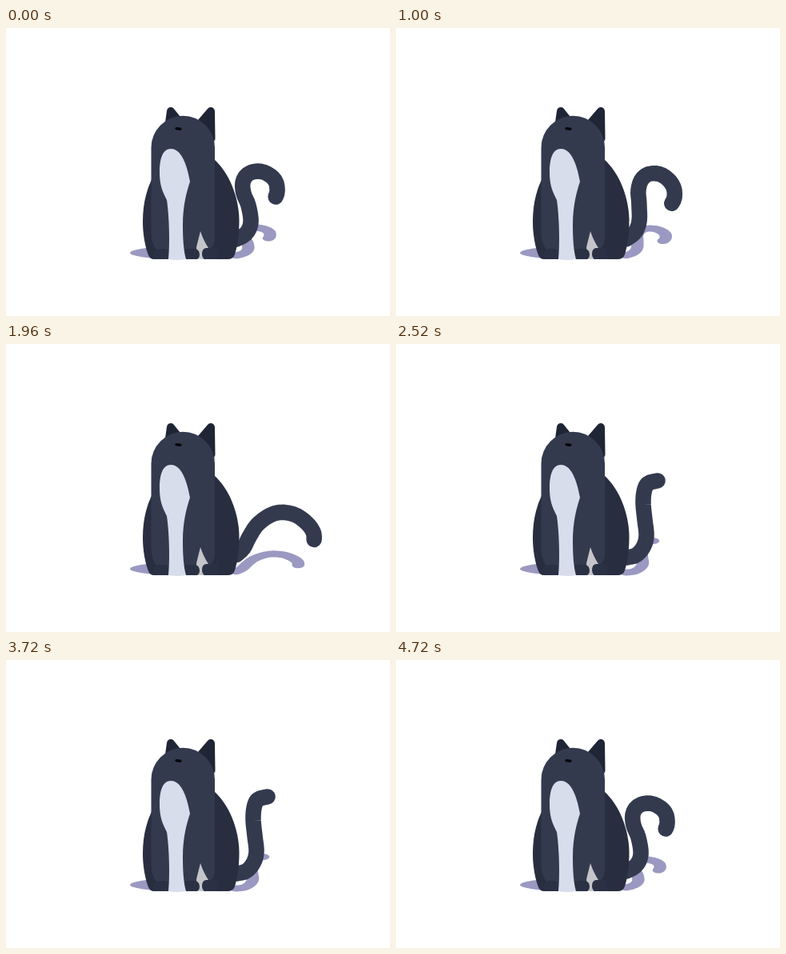
Write an HTML page with a canvas that moves like this. It is 480 by 360 pixels and loops after 4.8 s.

```html
<!DOCTYPE html>
<html lang="en">
<head>
<meta charset="utf-8">
<title>Cat wagging its tail</title>
<style>
html, body { margin: 0; width: 100%; height: 100%; overflow: hidden; background: #fff; }
canvas { display: block; width: 480px; height: 360px; }
</style>
</head>
<body>
<canvas id="stage" width="480" height="360"></canvas>
<script>
const ctx = document.getElementById('stage').getContext('2d');
const STEP = 40, LOOP = 1200, SWING = 1120, PARTS = 36;
const COAT = '#343a4e', SIDE = '#282e3f', PAW = '#2b3145', EAR = '#1f2535',
      BIB = '#d8ddeb', GAP = '#c5c5c9', SHADE = '#9b98c1';

// Tail centre lines, base to tip, at key times of the swing
const poses = [
  [0,   [288,264, 300,257, 306,243, 303,222, 297,207, 296,193, 302,183, 315,179, 328,183, 337,192, 339,204, 337,211]],
  [120, [288,267, 300,264, 309,254, 313,240, 311,220, 309,200, 310,185, 314,175, 322,172, 327,171]],
  [360, [288,262, 297,270, 309,282, 323,293, 346,299, 370,294, 384,283, 389,271, 387,260, 380,255]],
  [520, [288,257, 303,259, 318,264, 330,275, 340,292, 349,308, 360,321, 375,330, 386,329, 393,323]],
  [560, [288,257, 303,258, 319,263, 331,275, 339,292, 347,309, 357,325, 370,337, 381,342, 390,343]],
  [720, [288,263, 297,255, 306,241, 320,227, 343,219, 365,223, 381,234, 390,245, 392,254]]
];

function hermite(a, b, ma, mb, u) {
  const v = u * u, w = v * u;
  return (2 * w - 3 * v + 1) * a + (w - 2 * v + u) * ma + (3 * v - 2 * w) * b + (w - v) * mb;
}

// Smooth a point list and turn it into base height, length and headings
function measure(list) {
  const n = list.length / 2, fine = [];
  const at = (i, k) => list[2 * Math.max(0, Math.min(n - 1, i)) + k];
  for (let i = 0; i < n - 1; i++) {
    for (let j = 0; j < 16; j++) {
      fine.push([0, 1].map(k => hermite(at(i, k), at(i + 1, k),
        (at(i + 1, k) - at(i - 1, k)) / 2, (at(i + 2, k) - at(i, k)) / 2, j / 16)));
    }
  }
  fine.push([at(n - 1, 0), at(n - 1, 1)]);
  const dist = [0];
  for (let i = 1; i < fine.length; i++) {
    dist.push(dist[i - 1] + Math.hypot(fine[i][0] - fine[i - 1][0], fine[i][1] - fine[i - 1][1]));
  }
  const total = dist[dist.length - 1];
  const along = s => {
    let i = 1;
    while (i < dist.length - 1 && dist[i] < s) i++;
    const u = (s - dist[i - 1]) / (dist[i] - dist[i - 1]);
    return [0, 1].map(k => fine[i - 1][k] + (fine[i][k] - fine[i - 1][k]) * u);
  };
  const out = [list[1], total];
  let last = 0;
  for (let i = 0; i < PARTS; i++) {
    const p = along(total * i / PARTS), q = along(total * (i + 1) / PARTS);
    let a = Math.atan2(q[1] - p[1], q[0] - p[0]);
    a -= 2 * Math.PI * Math.round((a - last) / (2 * Math.PI));
    out.push(a);
    last = a;
  }
  return out;
}

const keys = poses.map(([t, list]) => ({ t, v: measure(list) }));

function key(i) {
  const n = keys.length, turn = Math.floor(i / n), k = keys[i - turn * n];
  return { t: k.t + turn * SWING, v: k.v };
}

function tailAt(t) {
  let i = 0;
  while (key(i + 1).t <= t) i++;
  const [p, a, b, q] = [-1, 0, 1, 2].map(d => key(i + d));
  const span = b.t - a.t, u = (t - a.t) / span;
  const val = a.v.map((x, k) => hermite(x, b.v[k],
    (b.v[k] - p.v[k]) / (b.t - p.t) * span, (q.v[k] - x) / (q.t - a.t) * span, u));
  let x = 288, y = val[0];
  const pts = [[x, y]], step = val[1] / PARTS;
  for (const h of val.slice(2)) {
    x += Math.cos(h) * step;
    y += Math.sin(h) * step;
    pts.push([x, y]);
  }
  return pts;
}

function strokeTail(pts, color) {
  ctx.beginPath();
  for (const p of pts) ctx.lineTo(p[0], p[1]);
  ctx.lineWidth = 19.5;
  ctx.lineCap = ctx.lineJoin = 'round';
  ctx.strokeStyle = color;
  ctx.stroke();
}

function fill(path, color) {
  ctx.fillStyle = color;
  ctx.fill(path);
}

function ear(x, y, base) {
  ctx.beginPath();
  ctx.moveTo(x, y);
  for (const p of base) ctx.lineTo(p[0], p[1]);
  ctx.closePath();
  ctx.lineWidth = 10;
  ctx.lineJoin = 'round';
  ctx.fillStyle = ctx.strokeStyle = EAR;
  ctx.fill();
  ctx.stroke();
}

const back = new Path2D('M190 176C176 196 171 219 171 242C171 258 174 274 178 284Q180 289 185 289H277Q284 289 286 283C290 270 291.5 255 291.5 240C291 211 279 181 260 164Z');
const front = new Path2D('M181.5 149.5A39.75 39.75 0 0 1 261 149.5V262Q261 276 249 277L243 254L238 289H204L203 277H188Q182 270 181.5 256Z');
const bib = new Path2D('M206 151C219 151 226 170 230 192C226 204 221 222 221 246C221 264 222 278 225 289Q214 291 203 289C205 270 204 235 201 215C197 206 192 199 192 180C192 163 196 151 206 151Z');
const gap = new Path2D('M243 254Q247 266 253 275L247 289H239L238 274Z');
const pawLeft = new Path2D('M191 276H199Q204 277 204 283V289H186Q183 286 184 282Q186 277 191 276Z');
const pawMid = new Path2D('M222 276H236Q242 277 242 283Q242 289 237 289H224Z');
const pawRight = new Path2D('M250 275H264V289H249Q245 288 245 282Q245 276 250 275Z');

function draw(ms) {
  const phase = Math.floor((ms % LOOP) / STEP) * STEP;
  const tail = tailAt(phase >= SWING ? 0 : phase);
  const u = (phase - 200) / 300;
  const flick = u > 0 && u < 1 ? Math.sin(Math.PI * u) ** 2 : 0;

  ctx.fillStyle = '#fff';
  ctx.fillRect(0, 0, 480, 360);

  ctx.fillStyle = SHADE;
  ctx.beginPath();
  ctx.ellipse(206, 281, 51, 7.5, 0, 0, 2 * Math.PI);
  ctx.fill();
  ctx.save();
  ctx.translate(288, 283.5);
  ctx.transform(0.79, 0, -0.03, 0.41, 0, 0);
  ctx.translate(-288, -262);
  strokeTail(tail, SHADE);
  ctx.restore();

  ear(206 - 2.5 * flick, 104, [[203.5, 122], [218, 119]]);
  ear(256 + 3 * flick, 104 + flick, [[256.5, 138], [244, 118]]);
  strokeTail(tail, COAT);
  fill(back, SIDE);
  fill(front, COAT);
  fill(gap, GAP);
  fill(pawLeft, PAW);
  fill(pawMid, PAW);
  fill(pawRight, PAW);
  fill(bib, BIB);

  ctx.fillStyle = '#05060a';
  ctx.beginPath();
  ctx.ellipse(215.5, 126, 4.2, 1.8, 0.12, 0, 2 * Math.PI);
  ctx.fill();
}

const start = performance.now();
function tick() {
  draw(performance.now() - start);
  requestAnimationFrame(tick);
}
tick();
</script>
</body>
</html>
```
